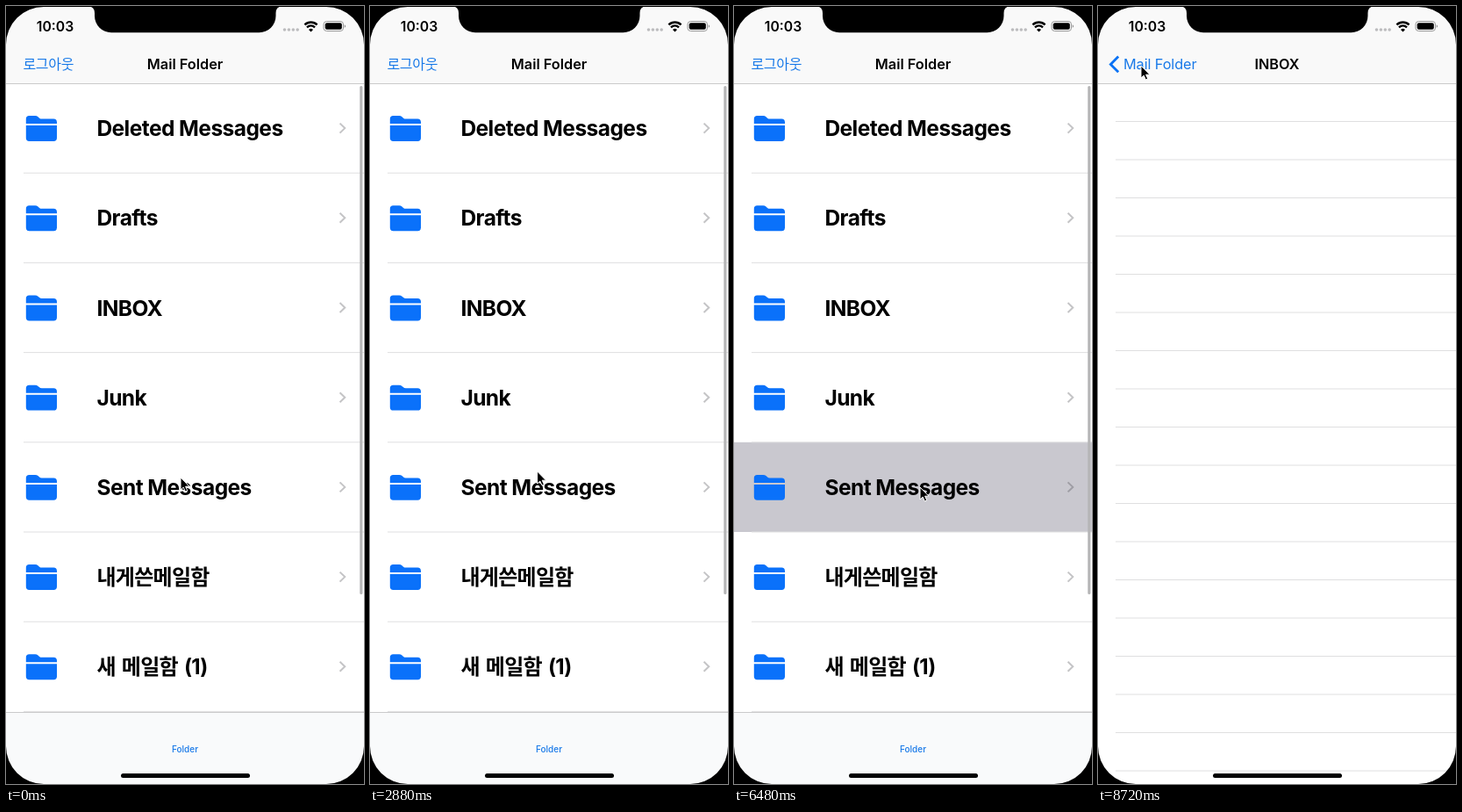
These frames come from a looping animation (408x886 px, 9600 ms). An HTML page:

```html
<!DOCTYPE html>
<html lang="ko">
<head>
<meta charset="utf-8">
<title>Mail Folder</title>
<style>
  html, body { margin: 0; width: 100%; height: 100%; overflow: hidden; background: #000; }
  svg { display: block; width: 100%; height: 100%; }
  text { font-family: Inter, "Noto Sans CJK KR", "Noto Sans CJK", sans-serif; font-size: 16.3px; white-space: pre; }
  .row { font-size: 24.5px; font-weight: 700; letter-spacing: -.55px; }
  .hangul { font-size: 24px; letter-spacing: -.7px; word-spacing: 2px; }
  .title { font-weight: 600; text-anchor: middle; }
  .link { fill: #1879e8; letter-spacing: -.1px; }
  .sender { font-weight: 700; }
  .subject { font-size: 11.3px; fill: #333; }
  .tab { font-size: 10px; font-weight: 500; text-anchor: middle; fill: #1879e8; }
  .line { stroke: #dfdfe0; }
  .edge { stroke: #cacacb; }
</style>
</head>
<body>
<svg viewBox="0 0 408 886">
  <linearGradient id="shadow"><stop stop-opacity="0"/><stop offset="1" stop-opacity=".35"/></linearGradient>
  <rect width="408" height="886" fill="#fff"/>
  <g id="list">
    <rect width="408" height="886" fill="#fff"/>
    <rect id="highlight" width="408" height="102.2" fill="#c9c8cf"/>
    <g id="folders"></g>
    <rect id="scrollbar" x="403.2" y="91" width="3.2" height="579" rx="1.6" fill="#b6b6b7"/>
    <rect y="804" width="408" height="82" fill="#f9fafb"/>
    <path class="edge" d="M0 804.5H408"/>
    <text class="tab" x="204" y="849.6">Folder</text>
    <rect id="dim" width="408" height="886"/>
  </g>
  <g id="page">
    <rect width="408" height="886" fill="#fff"/>
    <g id="mails"></g>
    <g id="empty"></g>
  </g>
  <rect width="408" height="88" fill="#f9f9f9"/>
  <rect id="barShade" x="350" width="58" height="88" fill="url(#shadow)"/>
  <path class="edge" d="M0 88.5H408"/>
  <text id="logout" class="link" x="19.4" y="72" style="font-size:16px;letter-spacing:-.3px">로그아웃</text>
  <text id="listTitle" class="title" x="204" y="72">Mail Folder</text>
  <text id="pageTitle" class="title" x="204" y="72"></text>
  <path id="backArrow" d="M23.2 57.6 14.4 66.4 23.2 75.2" fill="none" stroke="#0a72f5" stroke-width="2.8"/>
  <text id="backLabel" class="link" x="29" y="72">Mail Folder</text>

  <g id="status">
    <text x="56" y="29" class="title" style="font-size:15.7px">10:03</text>
    <path d="M317.5 27h15" stroke="#bcbcbe" stroke-width="3.6" stroke-linecap="round" stroke-dasharray="0 4.9"/>
    <path d="M340.4 21.4a10 10 0 0 1 14.2 0M343 24.3a6.3 6.3 0 0 1 9 0" fill="none" stroke="#000" stroke-width="2.4"/>
    <path d="M347.5 29.6l-2.5-2.6a3.5 3.5 0 0 1 5 0z"/>
    <rect x="362" y="17.5" width="22.5" height="11" rx="3.4" fill="none" stroke="#999"/>
    <rect x="363.7" y="19.2" width="19.1" height="7.6" rx="2"/>
    <path d="M385.7 21.2q1.5 .5 1.5 1.8t-1.5 1.8z" fill="#999"/>
  </g>
  <rect x="131" y="874" width="147" height="5" rx="2.5"/>
  <path fill-rule="evenodd" d="M0 0H408V886H0ZM43 1H365A43 43 0 0 1 408 44V843A43 43 0 0 1 365 886H43A43 43 0 0 1 0 843V44A43 43 0 0 1 43 1Z"/>
  <path d="M94 0Q101 1 101 8V11.2A19 19 0 0 0 120 30.2H288.5A19 19 0 0 0 307.5 11.2V8Q307.5 1 314.5 0Z"/>
  <path id="cursor" d="M0 0V14L3.2 11.1 5.4 16 7.8 15 5.6 10.2H10Z" stroke="#fff" stroke-linejoin="round"/>
</svg>
<script>
const LOOP = 9600, STEP = 80, SLIDE = 480, WIDTH = 408, TOP = 88;
const ROW = 102.2, MAIL_ROW = 84.4, EMPTY_ROW = 43.5;
const BACK = [49, 68];
const folders = ['Deleted Messages', 'Drafts', 'INBOX', 'Junk', 'Sent Messages', '내게쓴메일함', '새 메일함 (1)'];
const subjects = ['코어1', 'testForward', 'coreData', 'coredata', 'coredata', '[QA 2020]', '[개발] 지원', '안녕하세요', 'RE: qwer', '서안'];

// Each visit touches a folder, slides its page in and later goes back.
const visits = [
  { touch: [199, 537], press: 80, pop: 720 },
  { touch: [140, 544], press: 1360, pop: 2080 },
  { touch: [194, 541], press: 2960, pop: 3851 },
  { touch: [231, 556], press: 4400, pop: 5630 },
  { touch: [212, 548], press: 6480, pop: 7280 },
  { touch: [158, 331], press: 7920, pop: Infinity }
];

const $ = id => document.getElementById(id);
const clamp = v => Math.max(0, Math.min(1, v));
const easeOut = v => 1 - (1 - clamp(v)) ** 3;
const smooth = v => clamp(v) ** 2 * (3 - 2 * clamp(v));
const glide = (from, to, v) => from.map((start, i) => start + (to[i] - start) * smooth(v));
const line = y => `<path class="line" d="M20 ${y}H408"/>`;
const shift = (id, x, y = 0) => $(id).setAttribute('transform', `translate(${x} ${y})`);
const fade = (id, value) => $(id).setAttribute('opacity', clamp(value));

$('folders').innerHTML = folders.map((name, i) => {
  const y = TOP + ROW * (i + .5);
  return `<g transform="translate(0 ${y})">
    <path fill="#0a71fa" d="M22.8-5V-10.4q0-3.6 3.6-3.6h6.8q2 0 3.3 1.2l1.6 1.4q1 .9 2.6.9H54.2q3.8 0 3.8 3.8V-5ZM22.8-3H58V11.2q0 3.7-3.7 3.7H26.5q-3.7 0-3.7-3.7Z"/>
    <text class="row ${/[가-힣]/.test(name) ? 'hangul' : ''}" x="103.4" y="9">${name}</text>
    <path d="M380.5-5.5 386.2 0 380.5 5.5" fill="none" stroke="#3c3c434d" stroke-width="2"/>
  </g>` + line(y + ROW / 2);
}).join('');

$('mails').innerHTML = subjects.map((subject, i) => {
  const y = TOP + MAIL_ROW * i;
  return `<text class="sender" x="20" y="${y + 19.6}">박서안</text>
    <text class="subject" x="20" y="${y + 38.4}">${subject}</text>` + line(y + MAIL_ROW);
}).join('');

$('empty').innerHTML = Array.from({ length: 18 }, (_, i) => line(TOP + EMPTY_ROW * (i + 1))).join('');

function render(t) {
  const index = visits.findLastIndex(visit => t >= visit.press);
  const { touch, press, pop } = visits[Math.max(0, index)];
  const push = press + STEP, next = visits[index + 1];
  const row = Math.floor((touch[1] - TOP) / ROW), inbox = folders[row] === 'INBOX';
  const popping = t >= pop;
  const open = popping ? 1 - easeOut((t - pop) / SLIDE) : easeOut((t - push) / SLIDE);

  shift('list', -.3 * WIDTH * open);
  shift('page', WIDTH * (1 - open));
  fade('dim', .1 * open);
  fade('barShade', 4 * open * (1 - open));
  fade('mails', !inbox);
  fade('empty', inbox);

  shift('highlight', 0, TOP + ROW * row);
  fade('highlight', t >= press && !popping);
  fade('scrollbar', popping ? (t - pop - SLIDE - 60) / 160 : 1);

  $('pageTitle').textContent = folders[row];
  shift('listTitle', -146 * open);
  shift('backLabel', 146 * (1 - open));
  shift('pageTitle', 247 * (1 - open));
  fade('listTitle', 1 - open * open);
  fade('backLabel', open * open);
  fade('pageTitle', Math.sqrt(open));
  fade('backArrow', 1.2 * open);
  fade('logout', 1.35 - 3 * open);

  shift('cursor', ...(popping
    ? glide(BACK, next.touch, (t - pop) / (next.press - pop))
    : glide(touch, BACK, (t - push) / SLIDE)));
}

const start = performance.now();
function tick() {
  const t = (performance.now() - start) % LOOP;
  render(Math.floor(t / STEP) * STEP);
  requestAnimationFrame(tick);
}
tick();
</script>
</body>
</html>
```
